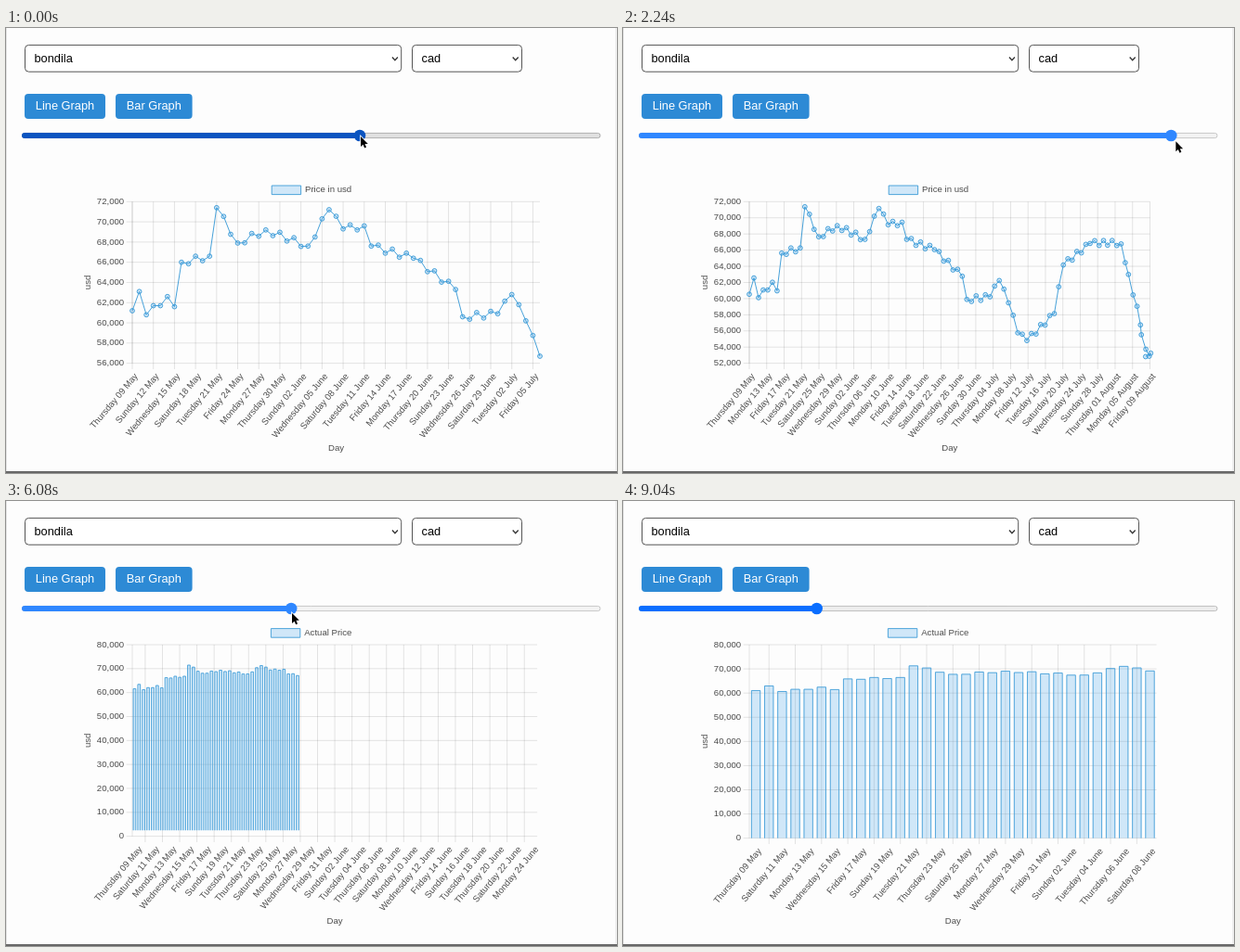
These frames come from a looping animation (658x480 px, 9.2 s). An HTML page with a canvas:

```html
<!DOCTYPE html>
<html lang="en">
<head>
<meta charset="utf-8">
<title>Price chart</title>
<style>
  html, body { margin: 0; width: 100%; height: 100%; overflow: hidden; background: #fdfdfd; }
  canvas { display: block; width: 658px; height: 480px; }
</style>
</head>
<body>
<canvas id="stage"></canvas>
<script>
const W = 658, H = 480, LOOP = 9200, STEP = 80;
const FONT = '"Liberation Sans", Arial, sans-serif';
const LEFT = 136, LAST_LABEL = 567.5, MAX_RIGHT = 575;
const BLUE = 'rgb(62,156,215)', PALE = 'rgba(40,148,225,.21)';
const GRID = 'rgba(0,0,0,.12)', INK = '#4c4c4c';
const TILT = 50 * Math.PI / 180;
const BARS_FROM = 4880, POINTER_END = 8640;
const THUMB_MIN = 24, THUMB_STEP = 6.155;

const canvas = document.getElementById('stage');
const ctx = canvas.getContext('2d');
const dpr = window.devicePixelRatio || 1;
canvas.width = W * dpr;
canvas.height = H * dpr;

// Turning points of the price: [day, thousands]
const turns = [
  [0, 61.2], [1, 63.1], [2, 60.8], [5, 62.6], [6, 61.6], [7, 66], [11, 66.6], [12, 71.4],
  [15, 67.9], [19, 69.2], [25, 67.6], [28, 71.2], [30, 69.3], [33, 69.6], [34, 67.6],
  [40, 66.4], [46, 63.3], [47, 60.6], [52, 60.9], [54, 62.8], [56, 60.2], [58, 56.7],
  [60, 55.8], [66, 59], [68, 64.8], [74, 67.6], [81, 68.2], [89, 53.9], [92, 61.3], [99, 57.6]
];

// Path of the pointer: [time, x, y]; the slider follows it while dragged
const pointerPath = [
  [900, 382, 117], [1510, 520, 130], [2450, 617, 120], [2926, 617, 120],
  [2927, 380.6, 117], [3780, 246, 118], [4640, 246, 119], [4840, 160, 86],
  [5020, 160, 86], [5280, 246, 117], [5515, 246, 118], [5516, 634, 119],
  [6064, 634, 121], [6065, 308, 121], [7040, 308, 117], [7260, 278, 113],
  [7340, 210, 110], [7980, 210, 110], [8640, 390, 300]
];
const drags = [[820, 4000], [5440, 7800]];

const sliderLook = {
  idle: ['#0a6eff', '#ededed', '#b0b0b0'],
  hover: ['#0a54c0', '#e0e0e0', '#a0a0a0'],
  drag: ['#2f87ff', '#f3f3f3', '#bbbbbb']
};

const easeOut = u => 1 - Math.pow(1 - Math.min(u, 1), 4);

function along(keys, t) {
  let i = 1;
  while (i < keys.length - 1 && keys[i][0] < t) i++;
  const a = keys[i - 1], b = keys[i];
  const u = Math.max(0, Math.min(1, (t - a[0]) / (b[0] - a[0])));
  return a.slice(1).map((v, j) => v + (b[j + 1] - v) * u);
}

// Days between turning points zigzag a little
const prices = Array.from({ length: 100 }, (_, i) => {
  const wobble = turns.some(([day]) => day === i) ? 0 : i % 2 ? 0.3 : -0.3;
  return along(turns, i)[0] + wobble;
});

function dayLabel(i) {
  const d = new Date(Date.UTC(2024, 4, 9 + i));
  const name = style => d.toLocaleDateString('en-US', { timeZone: 'UTC', ...style });
  const day = String(d.getUTCDate()).padStart(2, '0');
  return `${name({ weekday: 'long' })} ${day} ${name({ month: 'long' })}`;
}

const isDragged = t => drags.some(([a, b]) => t >= a && t < b);

function daysAt(t) {
  const [a, b] = drags.filter(([from]) => from <= t).pop() || drags[0];
  const [x] = along(pointerPath, Math.max(a, Math.min(b, t)));
  return Math.floor((x - THUMB_MIN) / THUMB_STEP) + 1;
}

function layout(bars, days, count) {
  const skip = Math.ceil(days / (bars ? 24.1 : 25.1));
  const ticks = [];
  for (let i = 0; i < days; i += skip) ticks.push(i);
  const shift = bars ? 0.5 : 0;
  const slots = bars ? days : days - 1;
  const last = ticks[ticks.length - 1] + shift;
  const gap = Math.min((LAST_LABEL - LEFT) / last, (MAX_RIGHT - LEFT) / slots);
  ctx.font = '9.6px ' + FONT;
  const widest = Math.max(...ticks.map(i => ctx.measureText(dayLabel(i)).width));
  const bottom = 428.5 - widest * Math.sin(TILT);
  const top = bars ? 155 : 187.3;
  const low = Math.min(...prices.slice(0, count));
  const min = bars ? 0 : Math.floor(low / 2) * 2;
  const max = bars ? 80 : 72;
  return {
    bars, ticks, gap, top, bottom, min, max,
    step: bars ? 10 : 2,
    right: LEFT + gap * slots,
    x: i => LEFT + (i + shift) * gap,
    y: v => bottom - (bottom - top) * (v - min) / (max - min)
  };
}

// Every change of slider, data or chart kind starts a new one second transition
function buildEvents() {
  const list = [];
  let before = '';
  for (let t = 0; t < LOOP; t += 10) {
    const days = daysAt(t), bars = t >= BARS_FROM;
    const loading = bars ? 650 : 70;
    const count = Math.min(days, daysAt(t - loading));
    const key = [days, count, bars].join();
    if (key !== before) {
      list.push({ t: t || -1000, count, plan: layout(bars, days, count) });
      before = key;
    }
  }
  return list;
}
const events = buildEvents();

function chartAt(t) {
  let points = [], base = 0, gap = 0, plan = null;
  for (let k = 0; k < events.length && events[k].t <= t; k++) {
    const e = events[k], next = events[k + 1];
    const fresh = !plan || plan.bars !== e.plan.bars;
    plan = e.plan;
    if (fresh) {
      points = [];
      base = plan.bottom;
      gap = plan.gap;
    }
    const u = easeOut((Math.min(t, next ? next.t : t) - e.t) / 1000);
    base += (plan.bottom - base) * u;
    gap += (plan.gap - gap) * u;
    points.length = Math.min(points.length, e.count);
    for (let i = 0; i < e.count; i++) {
      const x = plan.x(i), y = plan.y(prices[i]);
      const p = points[i] || (points[i] = { x, y: k ? plan.bottom : y });
      p.x += (x - p.x) * u;
      p.y += (y - p.y) * u;
    }
  }
  return { points, base, gap, plan };
}

function text(str, x, y, size, color, align = 'left', angle = 0, drop = 0) {
  ctx.save();
  ctx.translate(x, y);
  ctx.rotate(angle);
  ctx.font = `${size}px ${FONT}`;
  ctx.fillStyle = color;
  ctx.textAlign = align;
  ctx.textBaseline = 'middle';
  ctx.fillText(str, 0, drop);
  ctx.restore();
}

function box(x, y, w, h, r, fill, stroke, width = 1) {
  ctx.beginPath();
  ctx.roundRect(x, y, w, h, r);
  ctx.fillStyle = fill;
  ctx.fill();
  if (stroke) {
    ctx.strokeStyle = stroke;
    ctx.lineWidth = width;
    ctx.stroke();
  }
}

function path(pts, color, width) {
  ctx.beginPath();
  pts.forEach(([x, y]) => ctx.lineTo(x, y));
  ctx.strokeStyle = color;
  ctx.lineWidth = width;
  ctx.stroke();
}

function drawSelect(x, w, label) {
  box(x, 18.4, w, 28.8, 4, '#fff', '#555');
  text(label, x + 10, 33.3, 12.8, '#000');
  const c = x + w - 6.8;
  path([[c - 3, 31.5], [c, 34.8], [c + 3, 31.5]], '#333', 1.3);
}

function drawButton(x, w, label) {
  box(x, 71, w, 27, 4, '#2d8ad5');
  text(label, x + w / 2, 84.8, 12.8, '#fff', 'center');
}

function drawSlider(t) {
  const [, y] = along(pointerPath, t);
  const over = t < POINTER_END && Math.abs(y - 116) < 8;
  const [fill, track, edge] = sliderLook[isDragged(t) ? 'drag' : over ? 'hover' : 'idle'];
  const x = THUMB_MIN + (daysAt(t) - 1) * THUMB_STEP;
  box(17.4, 113.4, 622.6, 5.2, 2.6, track, edge, 0.8);
  box(17, 113, x - 17, 6, 3, fill);
  ctx.beginPath();
  ctx.arc(x, 116, 6.3, 0, 7);
  ctx.fill();
}

function drawAxes(p) {
  for (let v = p.min; v <= p.max; v += p.step) {
    const y = p.y(v);
    path([[LEFT - 6.4, y], [p.right, y]], GRID, 0.9);
    text((v * 1000).toLocaleString('en-US'), LEFT - 8.8, y, 9.6, INK, 'right');
  }
  path([[LEFT, p.top], [LEFT, p.bottom]], GRID, 0.9);
  const half = p.bars ? (p.x(p.ticks[1]) - p.x(0)) / 2 : 0;
  p.ticks.forEach(i => {
    const x = p.x(i);
    if (x - half >= LEFT) path([[x - half, p.top], [x - half, p.bottom + 6.4]], GRID, 0.9);
    text(dayLabel(i), x, p.bottom + 8.8, 9.6, INK, 'right', -TILT, 5.76);
  });
  text('Day', (LEFT + p.right) / 2, 453.8, 9.6, INK, 'center');
  text('usd', 88, (p.top + p.bottom) / 2, 9.6, INK, 'center', -Math.PI / 2);
}

function drawLegend(bars) {
  const x = bars ? 285.4 : 286.2, y = bars ? 142.4 : 174.8;
  box(x, y - 4.8, 31.4, 9.6, 0, PALE, BLUE, 0.9);
  text(bars ? 'Actual Price' : 'Price in usd', x + 35.8, y, 9.6, INK);
}

function drawBar(x, y, w, base) {
  const l = x - w / 2, r = x + w / 2;
  ctx.fillStyle = PALE;
  ctx.fillRect(l, y, w, base - y);
  path([[l + 0.4, base], [l + 0.4, y + 0.4], [r - 0.4, y + 0.4], [r - 0.4, base]], BLUE, 0.85);
}

function drawDot(x, y) {
  ctx.beginPath();
  ctx.arc(x, y, 2.4, 0, 7);
  ctx.fillStyle = PALE;
  ctx.fill();
  ctx.stroke();
}

function drawChart(t) {
  const { points, base, gap, plan } = chartAt(t);
  drawLegend(plan.bars);
  drawAxes(plan);
  ctx.save();
  ctx.beginPath();
  ctx.rect(LEFT - 5, plan.top - 5, plan.right - LEFT + 9, plan.bottom - plan.top + 10);
  ctx.clip();
  if (plan.bars) {
    points.forEach(p => drawBar(p.x, p.y, gap * 0.72, base));
  } else {
    path(points.map(p => [p.x, p.y]), BLUE, 0.95);
    points.forEach(p => drawDot(p.x, p.y));
  }
  ctx.restore();
}

function drawPointer(t) {
  if (t >= POINTER_END) return;
  const [x, y] = along(pointerPath, t);
  ctx.beginPath();
  [[0, 0], [0, 11], [2.5, 8.7], [4.2, 12.4], [6, 11.6], [4.5, 7.9], [7.8, 7.9]]
    .forEach(([dx, dy]) => ctx.lineTo(x + dx, y + dy));
  ctx.closePath();
  ctx.strokeStyle = '#fff';
  ctx.lineWidth = 1.6;
  ctx.stroke();
  ctx.fillStyle = '#000';
  ctx.fill();
}

function drawPage() {
  ctx.fillStyle = '#fdfdfd';
  ctx.fillRect(0, 0, W, H);
  ctx.fillStyle = '#e2e2e2';
  ctx.fillRect(0, 0, 1, 478);
  ctx.fillRect(656.5, 0, 1, 478);
  ctx.fillStyle = '#2a2a2a';
  ctx.fillRect(0, 478.3, W, 1.4);
  drawSelect(20.5, 405.2, 'bondila');
  drawSelect(437.5, 118, 'cad');
  drawButton(20, 87, 'Line Graph');
  drawButton(118, 82.6, 'Bar Graph');
}

function draw(t) {
  ctx.setTransform(dpr, 0, 0, dpr, 0, 0);
  drawPage();
  drawSlider(t);
  drawChart(t);
  drawPointer(t);
}

const start = performance.now();
let shown = -1;
function tick() {
  const t = (performance.now() - start) % LOOP;
  const stepped = Math.min(Math.floor(t / STEP) * STEP, LOOP - 2 * STEP);
  if (stepped !== shown) draw(shown = stepped);
  requestAnimationFrame(tick);
}
tick();
</script>
</body>
</html>
```
